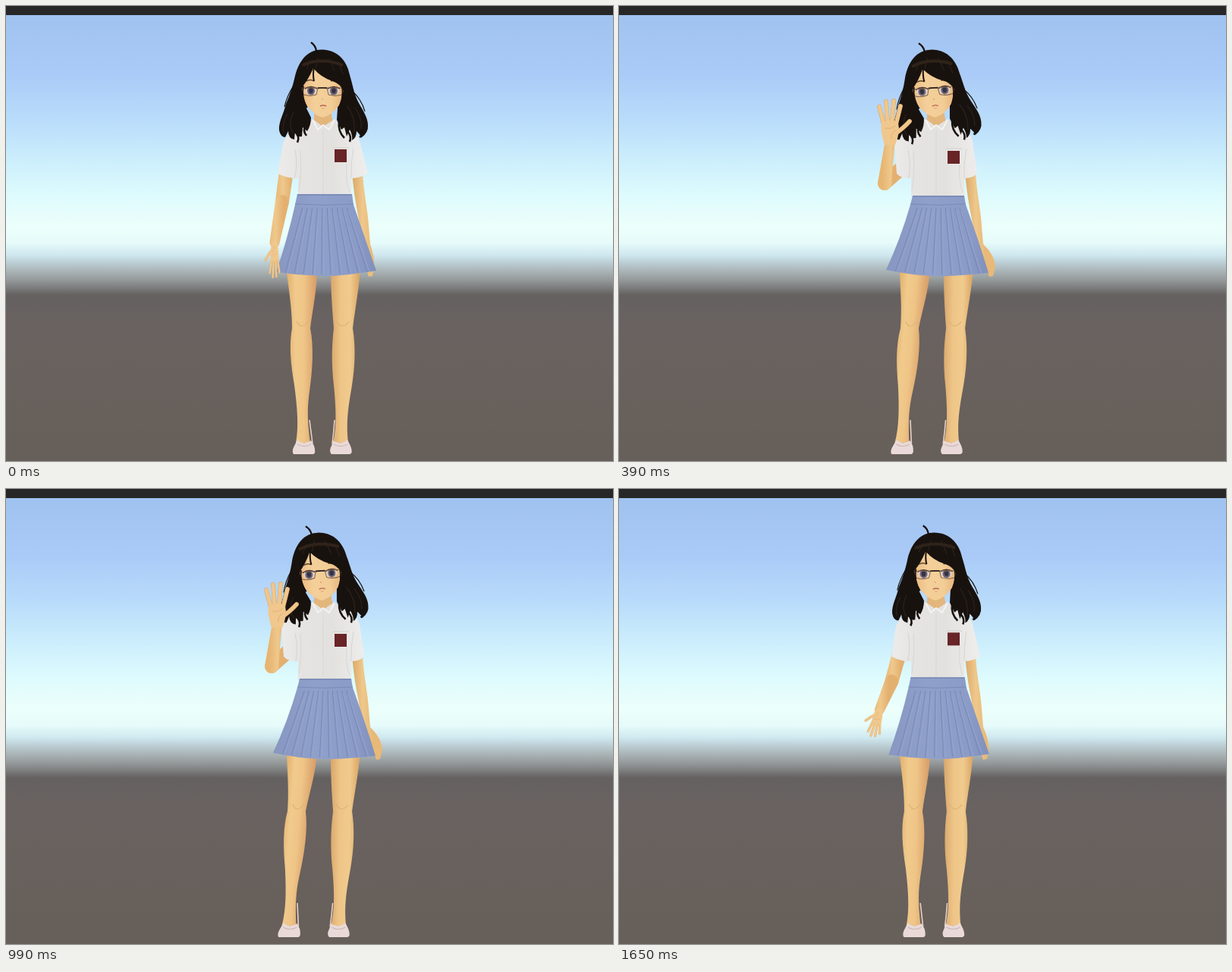
An HTML page with a canvas that plays this animation: 800 by 600 pixels, repeating every 1680 ms.

```html
<!DOCTYPE html>
<html lang="en">
<head>
<meta charset="utf-8">
<title>Waving girl</title>
<style>
  html, body { margin: 0; width: 100%; height: 100%; overflow: hidden; background: #272727; }
  canvas { display: block; width: 800px; height: 600px; }
</style>
</head>
<body>
<canvas id="stage" width="800" height="600"></canvas>
<script>
const ctx = document.getElementById('stage').getContext('2d');
const LOOP = 1680, STEP = 30, WAVE = 240;
const SKIN = '#efc88c', SKIN_DARK = '#d9a566', HAIR = '#18120f', SHIRT = '#e5e4e2';

const lerp = (a, b, k) => a + (b - a) * k;
const smooth = (from, to, t) => {
  const k = Math.min(1, Math.max(0, (t - from) / (to - from)));
  return k * k * (3 - 2 * k);
};

function gradient(x0, y0, x1, y1, ...stops) {
  const g = ctx.createLinearGradient(x0, y0, x1, y1);
  stops.forEach(([at, color]) => g.addColorStop(at, color));
  return g;
}
function fill(d, color) {
  ctx.fillStyle = color;
  ctx.fill(new Path2D(d));
}
function line(d, color, width = 1) {
  ctx.strokeStyle = color;
  ctx.lineWidth = width;
  ctx.stroke(new Path2D(d));
}
function oval(x, y, rx, ry, color) {
  ctx.fillStyle = color;
  ctx.beginPath();
  ctx.ellipse(x, y, rx, ry, 0, 0, 2 * Math.PI);
  ctx.fill();
}
function within(draw) {
  ctx.save();
  draw();
  ctx.restore();
}
// Leans what is drawn sideways: nothing at y = top, dx pixels at y = bottom.
function lean(top, bottom, dx) {
  const k = dx / (bottom - top);
  ctx.transform(1, 0, k, 1, -k * top, 0);
}

function drawBackground() {
  const at = (y, color) => [y / 600, color];
  ctx.fillStyle = gradient(0, 0, 0, 600,
    at(12, '#a0c2ef'), at(90, '#aacbf7'), at(150, '#b9dcfb'), at(200, '#cbedfc'),
    at(245, '#dcfafd'), at(290, '#ecfffb'), at(312, '#e6fbfa'), at(328, '#cfe8ef'),
    at(340, '#b9cbd0'), at(350, '#a9b3b5'), at(360, '#979c9d'), at(370, '#808282'),
    at(376, '#716f6f'), at(381, '#656161'), at(420, '#696260'), at(600, '#675f59'));
  ctx.fillRect(0, 0, 800, 600);
  ctx.fillStyle = '#272727';
  ctx.fillRect(0, 0, 800, 12);
}

function drawLegs(s) {
  within(() => {
    lean(352, 570, -18 * s);
    fill('M369 345H410C410 375 404 400 401 425C406 450 404 480 400 508C397 530 397 545 401 576H382C386 555 384 530 380 500C375 470 373 447 377 425C377 400 373 375 369 345Z',
      gradient(370, 0, 408, 0, [0, '#e2b06c'], [.3, '#f0ca8c'], [.6, '#efc587'], [1, '#d9a06a']));
    line('M383 416Q389 428 398 416', '#dfb274', 1.2);
    fill('M384 572Q392 580 402 573L406 580Q409 590 405 591H379Q376 587 380 580Z', '#e9dad9');
    line('M400 546Q402 562 404 577', '#e6d0c5', 1.6);
    line('M384 578Q393 583 402 578', '#cdb5b3');
  });
  within(() => {
    lean(352, 590, -3 * s);
    fill('M428 345H467C465 375 460 400 457 425C461 450 460 475 456 500C451 530 448 548 451 576H431C436 555 435 530 432 500C429 475 429 450 432 425C430 400 428 375 428 345Z',
      gradient(428, 0, 465, 0, [0, '#d9a66b'], [.35, '#eec587'], [.7, '#f0ca8d'], [1, '#dca868']));
    line('M436 416Q443 428 452 416', '#dfb274', 1.2);
    fill('M431 573Q441 580 450 572L454 580Q458 590 453 591H429Q425 587 429 580Z', '#e9dad9');
    line('M433 546Q432 562 430 577', '#e6d0c5', 1.6);
    line('M432 578Q441 583 450 578', '#cdb5b3');
  });
}

function drawFarArm(s) {
  const hand = 10 * s;
  fill(`M456 218H470C471 245 477 270 478 290L480 314Q${485 + hand} 328 ${486 + hand} 344L${483 + hand} 356L${478 + hand} 357
    Q${473 + hand} 340 471 318C467 285 459 260 456 218Z`,
    gradient(456, 0, 484, 0, [0, '#dba968'], [.5, SKIN], [1, '#e8b977']));
}

function drawShirt(s) {
  fill('M407 138H428L431 154L418 164L405 154Z', '#e3b67c');
  const left = lerp(358, 366, s), right = lerp(477, 472, s);
  fill(`M404 149L418 159L433 149L440 156Q461 162 466 178L${right} 221Q466 227 455 227L455 252H385V227
    Q372 228 ${left} 221L${lerp(365, 363, s)} 182Q371 162 398 156Z`,
    gradient(360, 0, 476, 0, [0, '#ecebea'], [.25, SHIRT], [.6, '#e2e1de'], [1, '#efeeed']));
  line(`M381 190Q385 210 ${lerp(380, 382, s)} 227M458 188Q454 207 455 227`, '#d6d4d1');
  line('M418 164V248M388 190Q390 220 386 244M449 208Q447 230 453 246', '#d8d7d4');
  line('M404 150L411 163L418 157L426 163L433 150', '#f4f3f1', 2);
  line(`M431 ${187 + s}H452`, '#d3d1ce');
  ctx.fillStyle = '#682426';
  ctx.fillRect(433, lerp(189, 191, s), 16, 17);
}

function drawSkirt(s) {
  const top = lerp(248, 250, s), waistL = lerp(384, 387, s), waistR = lerp(456, 455, s);
  const hemL = lerp(356, 352, s), hemR = lerp(488, 487, s), yL = lerp(351, 348, s), yR = lerp(349, 352, s);
  fill(`M${waistL} ${top}H${waistR}L${waistR + 2} 262Q474 309 ${hemR} ${yR}Q440 357 415 356Q385 355 ${hemL} ${yL}Q371 307 ${waistL - 3} 262Z`,
    gradient(355, 0, 488, 0, [0, '#8797c2'], [.4, '#8fa0cb'], [.8, '#8b9bc7'], [1, '#8090bb']));
  for (let i = 1; i < 11; i++) {
    const k = i / 11, x = lerp(waistL, waistR, k), hem = lerp(hemL, hemR, k);
    const y = lerp(yL, yR, k) + 4 * Math.sin(Math.PI * k);
    line(`M${x} 266Q${lerp(x, hem, .45)} 306 ${hem} ${y}`, '#7a8ab5', 1.1);
    line(`M${x + 2} 270Q${lerp(x, hem, .45) + 2} 306 ${hem + 3} ${y}`, '#95a5d0');
  }
  line(`M${waistL - 3} 261Q420 264 ${waistR + 2} 261`, '#7b8bb6');
  line(`M${waistL} ${top + 1}H${waistR}`, '#7989b4', 1.5);
}

function drawHair() {
  fill(`M417 57.5C400 57 387 69 381 92C378 106 374 117 369 129C366 142 359 153 360 164
    Q362 173 368 173L372 165Q372 175 380 176L381 165Q384 174 390 172L391 160L397 165Q402 157 402 147
    L396 135L400 95H438L437 135L436 150L442 163L446 160L449 172L453 163Q457 171 456 177Q462 174 462 165
    Q468 171 468 174Q478 167 477 157C477 146 469 136 463 124C458 113 457 104 453 91C449 70 435 58 417 57.5Z`, HAIR);
  line('M409 59Q408 52 402 48', HAIR, 2.3);
  line('M379 105Q370 119 367 133M456 112Q468 122 473 139', HAIR, 1.2);
  // Loose curled ends.
  line('M380 165Q388 172 384 180M396 155Q390 164 396 171M439 152Q437 165 446 174M450 165Q456 172 453 179M470 162Q474 168 466 173', HAIR, 2.6);
  line('M371 142Q363 156 366 166M379 140Q371 154 378 168M450 132Q461 148 459 166M460 134Q470 148 468 162', '#30251f');
}

function drawFace() {
  fill('M392 96Q389 118 396 131Q406 144 417 147Q430 144 439 131Q446 117 443 96L430 78H404Z',
    gradient(391, 0, 444, 0, [0, '#ebbb82'], [.3, '#f4cf99'], [.7, '#f3cd96'], [1, '#e6b57c']));
  for (const x of [402, 432]) {
    oval(x, 112, 7.5, 4.8, '#dfd0cb');
    oval(x, 112, 5, 5.5, '#6b667c');
    oval(x, 111.5, 2.8, 3.7, '#37323f');
    line(`M${x - 8} 109Q${x} 104 ${x + 8} 109`, '#4a342c', 1.5);
  }
  line('M396 99Q401 96 406 99M428 99Q435 97 440 101', '#5d4029', 1.5);
  line('M390 108H411L409 117Q400 120 392 117ZM423 108H445L443 117Q434 120 425 117ZM411 109Q417 106 423 109', '#7d6353', 1);
  line('M411 108H423', '#282021', 1.7);
  line('M416 122L418 124', '#d39c70');
  line('M414 132Q418 130 422 132', '#b96654', 1.4);
  line('M416 135H420', '#dfa17c');
  fill('M404 62L381 98L384 130Q389 125 390 107Q398 98 405 82Q415 94 430 99Q440 102 445 112L450 130L454 98Q447 63 420 59Z', HAIR);
  line('M406 80Q404 91 406 99', HAIR, 2);
  line('M392 105Q389 121 397 134M443 106Q445 123 438 135', HAIR, 1.5);
  line('M391 78Q415 67 444 78', 'rgba(91,66,47,.35)', 4);
  line('M401 72L396 83M412 68L408 82M426 69L433 86M438 73L444 90', '#30231b');
}

// Tapered limb segment with round ends.
function limb(x0, y0, r0, x1, y1, r1) {
  const a = Math.atan2(y1 - y0, x1 - x0) + Math.PI / 2;
  ctx.fillStyle = gradient(x1 - 10, 0, x1 + 12, 0, [0, '#e7b572'], [.5, SKIN], [1, '#e3b070']);
  ctx.beginPath();
  ctx.arc(x0, y0, r0, a, a + Math.PI);
  ctx.arc(x1, y1, r1, a + Math.PI, a + 2 * Math.PI);
  ctx.fill();
}

function drawHand(x, y, angle, scaleX, scaleY) {
  within(() => {
    ctx.translate(x, y);
    ctx.rotate(angle);
    ctx.scale(scaleX, scaleY);
    ctx.lineCap = 'round';
    const fingers = ['M-8 -24L-14 -47', 'M-3 -27L-5 -54', 'M3 -27L5 -55', 'M8 -24L14 -48', 'M6 -11Q17 -18 26 -28'];
    fingers.forEach(d => line(d, SKIN_DARK, 5.8));
    fingers.forEach(d => line(d, '#f0c78c', 4.8));
    fill('M-7 3Q-13 -16 -11 -26Q0 -33 11 -26Q14 -13 7 3Z', '#f0c78c');
    line('M-6 -19Q2 -17 7 -22M2 -5Q1 -13 8 -16', '#dfb077', .9);
  });
}

const elbow = s => [lerp(364, 350, s) - 4 * Math.sin(Math.PI * s), lerp(258, 234, s)];

function drawUpperArm(s) {
  limb(lerp(370, 372, s), 214, 9.5, ...elbow(s), 9);
}

function drawForearm(s, wave) {
  // The wrist swings up along a curve bulging away from the body.
  const bend = (a, b, c) => lerp(lerp(a, b, s), lerp(b, c, s), s);
  const wristX = bend(354, 318, 357 + 6 * wave), wristY = bend(312, 256, 180);
  limb(...elbow(s), 9, wristX, wristY, 6.5);
  drawHand(wristX, wristY, lerp(-Math.PI, .36 * wave, s ** 1.4),
    lerp(.45, 1, s), lerp(.82, 1, s) - .4 * Math.sin(Math.PI * s));
}

function draw(t) {
  const s = smooth(0, 210, t) - smooth(1460, 1720, t);
  const wave = -Math.cos(2 * Math.PI * ((t - 540) / WAVE - .625));
  drawBackground();
  drawLegs(s);
  drawFarArm(s);
  drawUpperArm(s);
  drawShirt(s);
  drawSkirt(s);
  within(() => {
    ctx.translate(416, 150);
    ctx.rotate(-.07 * s);
    ctx.translate(-416, -150);
    drawHair();
    drawFace();
  });
  drawForearm(s, wave);
}

function tick() {
  draw(Math.floor(performance.now() % LOOP / STEP) * STEP);
  requestAnimationFrame(tick);
}
tick();
</script>
</body>
</html>
```
